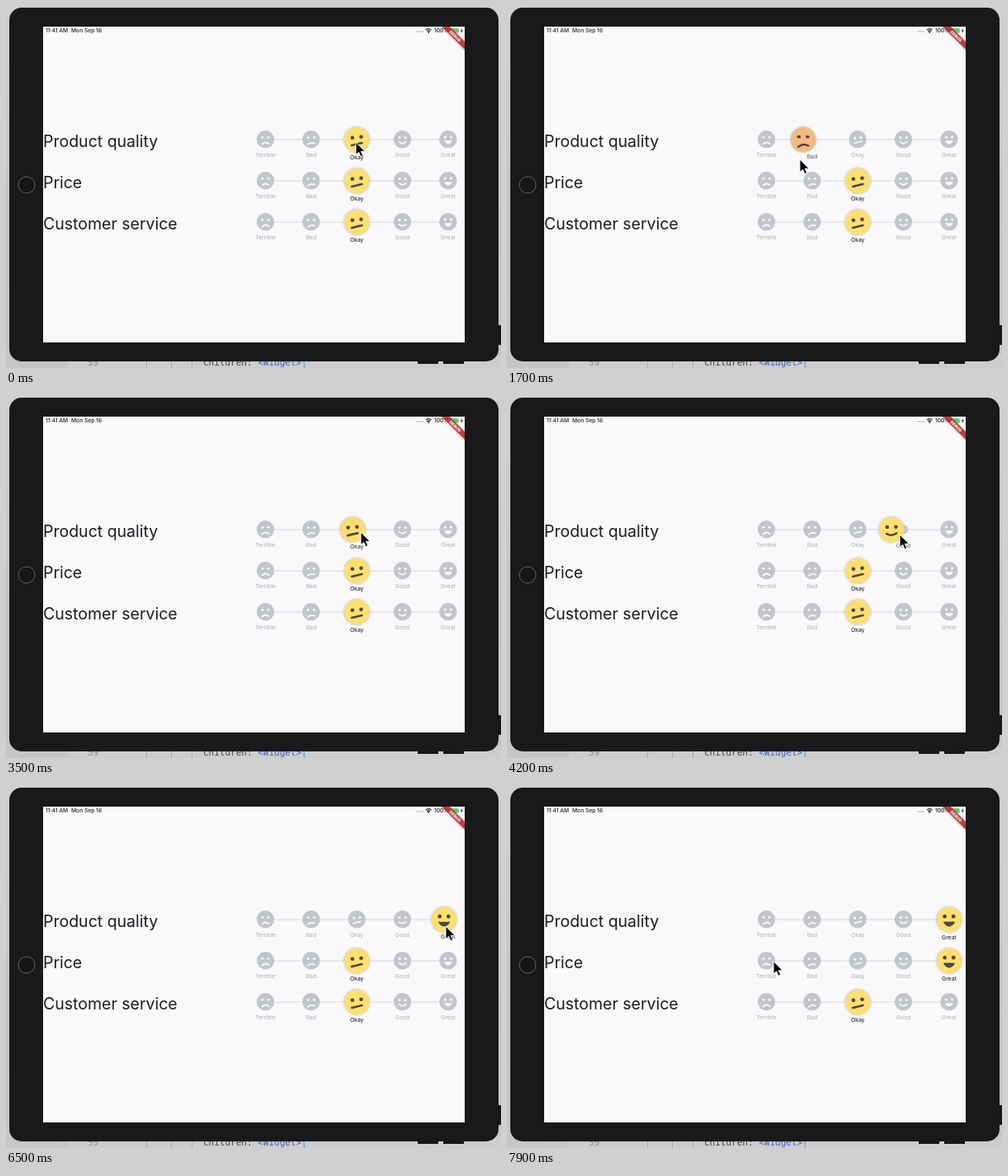
An HTML page that plays this animation: 600 by 439 pixels, repeating every 8000 ms.

```html
<!DOCTYPE html>
<html lang="en">
<head>
<meta charset="utf-8">
<title>Review sliders</title>
<style>
  html, body { margin: 0; width: 100%; height: 100%; overflow: hidden; background: #c9c9cb; }
  svg { display: block; width: 600px; height: 439px; font-family: Inter, "Open Sans", sans-serif; }
  .code { font: 11px "DejaVu Sans Mono", monospace; }
  .status { font-size: 6.7px; font-weight: 500; fill: #222; }
  .name { font-size: 19.5px; fill: #1d1c20; }
  .mark { font-size: 6.8px; text-anchor: middle; }
</style>
</head>
<body>
<svg viewBox="0 0 600 439">
  <defs>
    <filter id="soft" x="-30%" y="-30%" width="160%" height="160%"><feGaussianBlur stdDeviation="0.9"/></filter>
    <linearGradient id="desk" x2="0" y2="1">
      <stop offset="0" stop-color="#d0d0d1"/>
      <stop offset=".6" stop-color="#c3c3c5"/>
      <stop offset="1" stop-color="#c6c6c8"/>
    </linearGradient>
    <clipPath id="screen"><rect x="45" y="25" width="511" height="383"/></clipPath>
  </defs>

  <!-- desktop behind the tablet -->
  <rect width="600" height="439" fill="url(#desk)"/>
  <path d="M75 425H600V439H75Z" fill="#cdcdcf"/>
  <path d="M170.5 430V439M200.5 430V439M225.5 430V439" stroke="#aaaaad"/>
  <g class="code">
    <text x="99" y="436" fill="#8b8b8e">59</text>
    <text x="239" y="436" fill="#444">children: <tspan fill="#3b62b5">&lt;Widget&gt;</tspan><tspan fill="#4a9cc8">[</tspan></text>
  </g>
  <path d="M499 429H524V434H499ZM530 429H555V434H530ZM594 387H600V411H594Z" fill="#151416"/>

  <!-- tablet -->
  <rect x="4" y="2" width="593" height="429" rx="15" fill="#19181b"/>
  <circle cx="25" cy="217" r="10" fill="#161518" stroke="#626164"/>
  <rect x="45" y="25" width="511" height="383" fill="#f9f8fb"/>

  <g class="status">
    <text x="48" y="32.4">11:41 AM</text>
    <text x="79" y="32.4">Mon Sep 16</text>
    <text x="519" y="32.4">100%</text>
  </g>
  <path d="M498 31H506" stroke="#777" stroke-width="1.2" stroke-dasharray="1.2 1.1"/>
  <path d="M508.8 29.1Q512.2 26.2 515.6 29.1M510.2 30.7Q512.2 29 514.2 30.7" fill="none" stroke="#222" stroke-width="1.2"/>
  <circle cx="512.2" cy="32" r=".9" fill="#222"/>
  <rect x="538" y="27.5" width="10.5" height="5" rx="1.2" fill="#4cd964" stroke="#999" stroke-width=".5"/>
  <path d="M552.8 27L550.7 30.4H552.1L551.6 33L553.8 29.6H552.4Z" fill="#222"/>
  <g clip-path="url(#screen)">
    <g transform="translate(544.5 36.5) rotate(45)">
      <rect x="-30" y="-3.3" width="60" height="7.6" fill="#777" opacity=".45" filter="url(#soft)"/>
      <rect x="-30" y="-3.4" width="60" height="6.8" fill="#b71c1c" opacity=".78"/>
      <text y="1.9" text-anchor="middle" font-size="5" font-weight="800" fill="#fff">DEBUG</text>
    </g>
  </g>

  <g class="name">
    <text x="45" y="170.5">Product quality</text>
    <text x="45" y="220.5">Price</text>
    <text x="45" y="270.5">Customer service</text>
  </g>
  <g id="sliders"></g>
  <path id="cursor" d="M0 0V15.6L3.6 12.3L6 17.8L8.7 16.6L6.3 11.3H11.2Z" fill="#000" stroke="#fff" stroke-width="1"/>
</svg>

<script>
const LOOP = 8000, LEFT = 314.5, STEP = 55.35;
const LABELS = ['Terrible', 'Bad', 'Okay', 'Good', 'Great'];

// Per mood: left/right eye y, eye height, left/right mouth corner y,
// upper and lower lip control y, lip width
const MOODS = [
  [-3.6, -3.6, 1.9, 8.6, 8.2, 2.8, 2.8, 2.5],
  [-3.2, -3.4, 1.9, 9, 7.4, 4, 4, 2.5],
  [-2.3, -3.2, 2.3, 7, 4, 5.5, 5.5, 2.7],
  [-3.3, -3.3, 2.3, 4.3, 4.3, 10.2, 10.2, 2.4],
  [-3.8, -3.8, 2.4, 3.2, 3.2, 3.2, 12, 1.6],
];
const SKINS = [[240, 162, 130], [245, 192, 130], [255, 223, 111], [255, 223, 111], [255, 223, 111]];

// [time, x, y] for the pointer, [time, x] for the thumbs
const POINTER = [
  [0, 424, 165], [300, 424, 165], [1100, 391, 172], [1200, 391, 173], [1700, 355, 186],
  [2100, 323, 177], [2400, 319, 174.5], [2700, 319, 174.5], [3500, 430, 165], [3600, 436, 166],
  [4500, 496, 169], [4900, 529, 168.5], [5400, 533, 170], [6500, 533, 170], [7100, 536, 213],
  [7400, 536, 214], [7900, 323, 212.5],
];
const DRAG = [
  [0, 425.2], [300, 425.2], [1100, 398], [1200, 398], [2100, 328], [2400, 317], [2700, 317],
  [3500, 420], [3600, 426], [4500, 486], [4900, 521], [5400, 531], [6500, 531], [6700, 535.9],
];

const sliders = document.getElementById('sliders');
const cursor = document.getElementById('cursor');
const clamp = (v, lo = 0, hi = 1) => Math.min(hi, Math.max(lo, v));
const mix = (a, b, k) => a.map((v, i) => v + (b[i] - v) * k);
const rgb = c => `rgb(${c.map(Math.round)})`;

function sample(keys, t) {
  const i = keys.findIndex(k => k[0] > t);
  if (i < 0) return keys.at(-1).slice(1);
  const a = keys[i - 1], b = keys[i];
  return mix(a, b, (t - a[0]) / (b[0] - a[0])).slice(1);
}

function between(list, v) {
  const i = clamp(Math.floor(v), 0, list.length - 2);
  return mix(list[i], list[i + 1], clamp(v - i));
}

function features(mood, color) {
  const [el, er, h, l, r, top, low, w] = between(MOODS, mood);
  return `<g fill="${color}"><ellipse cx="-5.3" cy="${el}" rx="2.3" ry="${h}"/>
    <ellipse cx="5.3" cy="${er}" rx="2.3" ry="${h}"/>
    <path d="M-6 ${l}Q0 ${top} 6.2 ${r}Q0 ${low} -6 ${l}Z" stroke="${color}"
      stroke-width="${w}" stroke-linejoin="round"/></g>`;
}

function slider(x, y) {
  const value = (x - LEFT) / STEP;
  const marks = LABELS.map((label, i) => {
    const cx = LEFT + i * STEP;
    const near = clamp(1 - 2 * Math.abs(value - i));
    const color = rgb(mix([174, 174, 179], [20, 20, 22], near));
    return `<g transform="translate(${cx} ${y - 0.3}) scale(${0.68 * (1 - near)})">
        <circle r="15.6" fill="#c2c5cc"/>${features(i, '#f9f8fb')}</g>
      <text class="mark" x="${cx}" y="${y + 21.2 + 2.4 * near}" fill="${color}">${label}</text>`;
  });
  return `<path d="M${LEFT} ${y}H${LEFT + 4 * STEP}" stroke="#e1e3e7" stroke-width="1.3"/>
    ${marks.join('')}
    <g transform="translate(${x} ${y})">
      <circle r="16" fill="#b9bbc4" opacity=".75" filter="url(#soft)"/>
      <circle r="15.1" fill="${rgb(between(SKINS, value))}"/>${features(value, '#4a4848')}</g>`;
}

function draw(now) {
  const t = now % LOOP;
  const okay = LEFT + 2 * STEP;
  const k = clamp((t - 7200) / 450);
  const eased = k * k * (3 - 2 * k);
  sliders.innerHTML = slider(sample(DRAG, t)[0], 162)
    + slider(okay + 2 * STEP * eased, 212)
    + slider(okay, 262);
  cursor.setAttribute('transform', `translate(${sample(POINTER, t)})`);
  requestAnimationFrame(draw);
}
requestAnimationFrame(draw);
</script>
</body>
</html>
```
